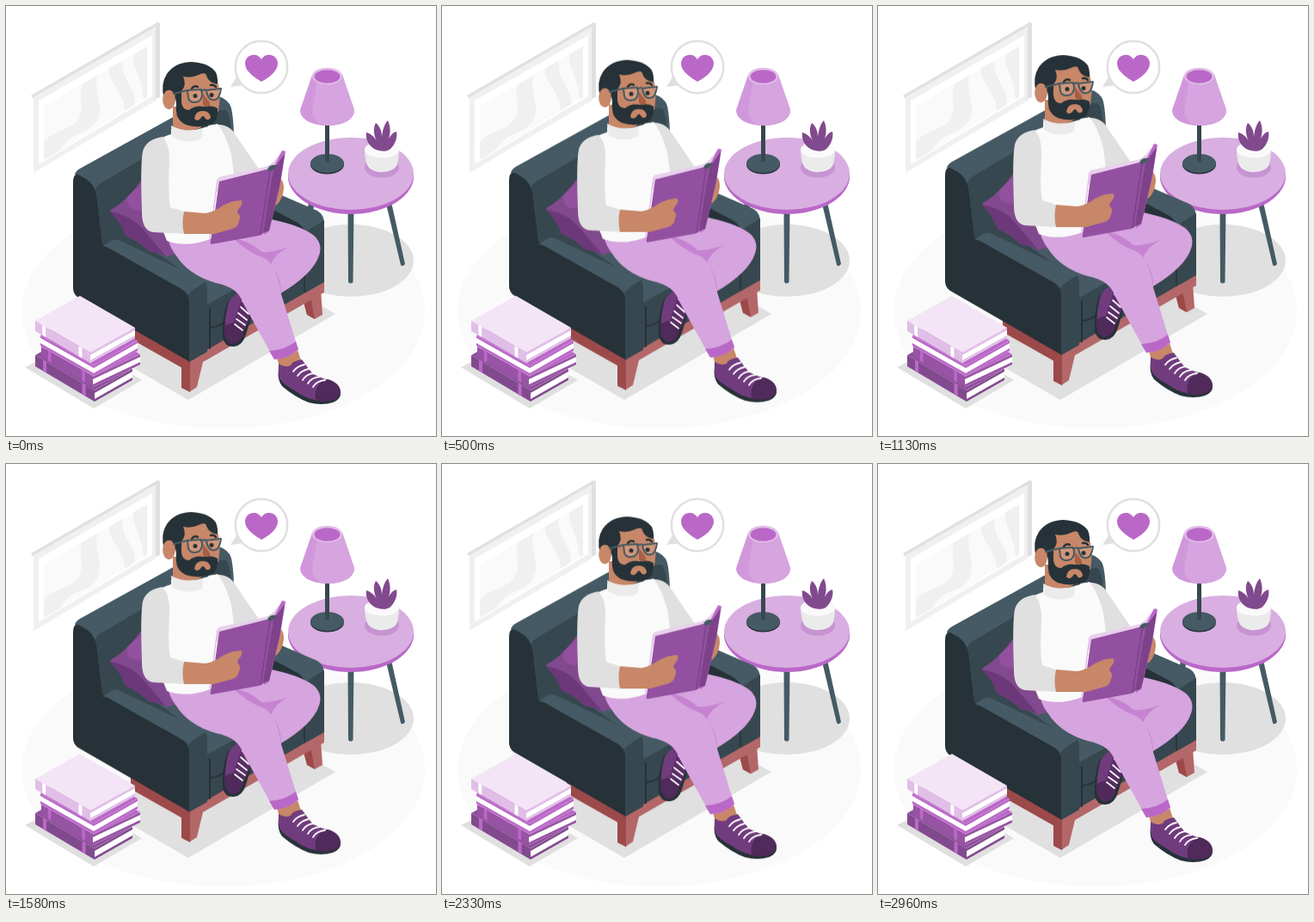
An HTML page for the animation above (3 s loop, 500 by 500 pixels).

```html
<!DOCTYPE html>
<html lang="en">
<head>
<meta charset="utf-8">
<title>Reading in an armchair</title>
<style>
html, body { margin: 0; width: 100%; height: 100%; overflow: hidden; background: #fff; }
svg { display: block; width: 100%; height: 100%; }
.float { animation: float 1.5s cubic-bezier(.37, 0, .63, 1) infinite alternate; }
@keyframes float { to { transform: translateY(-9.2px); } }
.line { fill: none; stroke-linecap: round; stroke-linejoin: round; }
.dark { fill: #263238; }
.mid { fill: #37474f; }
.light { fill: #455a64; }
.skin { fill: #c78768; }
.lilac { fill: #d6a4de; }
.violet { fill: #ba68c8; }
.plum { fill: #713c7e; }
.deep { fill: #4f2a5a; }
.grey { fill: #e0e0e0; }
</style>
</head>
<body>
<svg viewBox="0 0 500 500">
  <defs>
    <clipPath id="art"><path d="M44 117L164 47V106L44 179Z"/></clipPath>
  </defs>

  <!-- floor -->
  <ellipse cx="252.500" cy="355" rx="234.500" ry="136.500" fill="#fafafa"/>
  <ellipse class="grey" cx="401" cy="296" rx="73" ry="42"/>
  <path class="grey" d="M100 393L212 458L383 358L290 305Z"/>
  <path class="grey" d="M22 420L102 468L158 435L80 390Z"/>

  <!-- picture -->
  <path class="grey" d="M29 104L176 19L179 20V106L174 108L33 109Z"/>
  <path fill="#f0f0f0" d="M32 106L174 24V110L32 194Z"/>
  <path fill="#fff" d="M38 110L170 34V105L38 184Z"/>
  <path fill="#fafafa" d="M44 117L164 47V106L44 179Z"/>
  <g clip-path="url(#art)" fill="#f0f0f0">
    <path d="M44 158C58 142 78 146 86 128C92 114 82 106 90 87L108 77C98 100 118 116 104 136C90 152 76 144 62 169L44 181Z"/>
    <path d="M120 70C116 88 138 98 138 122L150 115C152 94 132 86 136 61Z"/>
    <path d="M148 54C146 72 158 80 160 109L168 104V45Z"/>
  </g>

  <!-- thought bubble -->
  <path class="grey" d="M261 94L269 81L278 92Z"/>
  <circle cx="297" cy="71" r="30.200" fill="#fff" stroke="#e0e0e0" stroke-width="2.500"/>
  <path class="violet" d="M297 88C289 83 278 76 278 67C278 56 292 53 297 62C302 53 316 56 316 67C316 76 305 84 297 88Z"/>

  <!-- table -->
  <path class="light" d="M352 228H359L350 272H345ZM442 230L448 228L464 300Q461 304 459 301ZM397.500 236H404.500L403.500 321Q401 324 398 321Z"/>
  <path class="violet" d="M328 195V201C331 224 363 242 401 242S471 224 474 201V195Z"/>
  <ellipse cx="401" cy="195" rx="73" ry="42" fill="#d9aee1"/>
  <ellipse class="dark" cx="373.500" cy="184.300" rx="19.500" ry="11.300"/>
  <ellipse class="light" cx="373.500" cy="183" rx="19.500" ry="11"/>
  <path class="mid" d="M371 133H376V180Q373.500 183 371 180Z"/>
  <path fill="#d197db" d="M356 80L342 121C342 132 356 139 374 139S405 132 405 121L391 80Z"/>
  <path fill="#d6a4de" d="M362 87L356 121Q356 133 368 139C390 140 405 133 405 121L391 80Z"/>
  <ellipse cx="373.500" cy="81.500" rx="17.500" ry="9.800" fill="#e1bee7"/>
  <ellipse class="violet" cx="373.500" cy="82" rx="15" ry="7.800"/>

  <!-- plant -->
  <ellipse cx="437" cy="188" rx="20" ry="11.500" fill="#c794d2"/>
  <path fill="#ebebeb" d="M417 166Q417 182 422 188Q429 194 438 193Q449 193 454 186Q457 180 457 166Z"/>
  <ellipse cx="437" cy="167" rx="20" ry="9.500" fill="#fafafa"/>
  <path fill="#824a8e" d="M428 166C420 161 418 153 419 147C425 149 429 153 431 157C427 148 427 141 430 136C435 140 437 146 437 152C438 144 440 137 444 133C448 142 447 150 444 157C446 151 450 147 454 146C456 154 451 163 446 167C441 170 434 169 428 166Z"/>

  <g class="float">
    <!-- wooden base -->
    <path fill="#9c494a" d="M145 371L214 408V426L145 387Z"/>
    <path fill="#b36768" d="M345 340L366 330L368 359L359 364L350 359Z"/>
    <path fill="#9c494a" d="M345 340L354 338L359 364L350 359Z"/>
    <path fill="#b36768" d="M213 406L370 315V333L229 414L222 443L213 449Z"/>
    <path fill="#9c494a" d="M204 404L214 406V449L204 444Z"/>

    <!-- armchair -->
    <path class="mid" d="M95 260L230 240L350 250L369 260V321L213 412L120 358Z"/>
    <path class="light" d="M80 196Q81 192 86 189L238 105Q252 103 260 114Q264 120 265 150L285 205L240 285L112 280L98 206Z"/>
    <path class="mid" d="M104 213Q105 209 112 205L242 128Q247 118 257 122Q261 130 262 150L285 215L220 300L112 278Z"/>
    <path class="dark" d="M306 220L350 250V290L300 300L270 280Z"/>
    <path class="light" d="M140 262L236 262L346 285L234 347L222 320Z"/>
    <path class="line" stroke="#263238" stroke-width="2" d="M237 398V352M237 374Q244 374 252 369L348 313"/>
    <path class="light" d="M318 219L362 238Q371 243 370 256L350 268Q347 257 339 252L311 237Z"/>
    <path class="mid" d="M347 270Q348 263 354 259L370 249V321L347 334Z"/>
    <path class="line" stroke="#263238" stroke-width="1.500" d="M347 332V280"/>
    <path class="dark" d="M78 205Q78 193 86 197L93 201Q103 208 105 219L112 277L130 287L204 329Q213 335 214 346V414L84 339Q78 335 78 328Z"/>
    <path class="light" d="M112 280L122 273Q127 270 133 273L225 317Q232 320 233 328L214 340Q211 333 204 329L124 284Q116 279 112 280Z"/>
    <path class="mid" d="M211 337Q217 329 232 321Q234 325 234 330V402L213 414V345Q213 339 211 337Z"/>

    <!-- cushion -->
    <path fill="#824a8e" d="M121 239Q122 236 127 234Q144 222 157 203L172 207L204 289Q190 289 187 292Q176 286 166 285Q154 273 139 267Q134 252 121 239Z"/>
    <path fill="#6c3879" d="M121 239L127 240Q148 246 158 258L186 291Q176 286 166 285Q154 273 139 267Q134 252 121 239Z"/>
    <path fill="#92509e" d="M141 222L157 207V238Q139 238 141 222Z"/>

    <!-- far arm and hand -->
    <path class="grey" d="M235 139Q258 134 267 150L293 188L289 200L257 204Z"/>
    <path class="skin" d="M309 196L319 201Q323 203 323 212Q322 224 315 231L305 235Z"/>

    <!-- far shoe -->
    <path class="dark" d="M258 343Q250 365 252 386Q255 397 265 396Q275 395 279 382L287 355L280 335Z"/>
    <path class="plum" d="M259 344Q268 331 275 334L285 348Q284 365 276 378Q263 393 255 382Q253 365 259 344Z"/>
    <path fill="#5a2e66" d="M276 335L285 348Q284 365 277 376L264 370Z"/>
    <path class="deep" d="M254 372Q268 364 277 375Q274 394 262 393Q253 389 254 372Z"/>
    <path class="line" stroke="#fff" stroke-width="1.700" d="M275 343L284 350M273 350L282 358M270 357L280 365M268 364L278 371M266 370L275 377"/>

    <!-- legs -->
    <path class="lilac" d="M258 262L302 247Q338 253 357 266Q369 276 364 290Q357 312 318 335L280 320Z"/>
    <path fill="#c683d2" d="M258 268Q284 273 297 286Q310 287 329 280Q312 288 308 301Q319 312 320 332L296 320Z"/>
    <path class="skin" d="M314 405L338 397L344 415Q336 424 318 420Z"/>
    <path class="lilac" d="M189 273L240 266L262 268Q281 287 300 293Q316 302 320 335L340 400Q328 410 312 411L276 346Q270 327 244 322Q212 313 197 289Q191 281 189 273Z"/>
    <path class="violet" d="M306 401Q325 400 337 390L340 399Q330 410 312 411Z"/>

    <!-- near shoe -->
    <path class="dark" d="M317 423Q315 434 321 442Q336 455 352 461Q367 465 380 461Q390 457 389 449L350 435Z"/>
    <path class="plum" d="M317 416Q324 421 331 418Q332 413 344 411Q351 421 357 428Q367 433 379 436Q389 441 389 449Q387 458 371 459Q353 460 337 448Q322 440 318 433Q316 425 317 416Z"/>
    <path class="deep" d="M360 459Q357 439 374 434Q388 438 389 449Q388 459 371 460Z"/>
    <path class="line" stroke="#fff" stroke-width="1.800" d="M334 425Q338 419 347 417M339 430Q343 424 352 422M345 435Q349 428 358 427M351 439Q355 432 365 431M357 443Q361 436 371 435"/>

    <!-- neck and jumper -->
    <path fill="#fafafa" d="M192 143Q211 151 228 142L246 137Q256 150 262 173L265 196L248 204L240 270Q211 282 187 273L180 255L173 160Q178 153 192 149Z"/>
    <path class="grey" d="M182 152Q163 155 159 169Q156 185 158 240Q158 261 171 263L208 265L207 239L191 234Q188 219 190 181Q191 162 182 152Z"/>
    <path fill="#ebebeb" d="M192 139Q211 147 229 142L228 154Q210 162 193 152Z"/>
    <path class="skin" d="M194 117H226V142Q211 148 194 140Z"/>
    <path fill="#a96a50" d="M197 126L227 134V141Q204 140 197 126Z"/>

    <!-- head -->
    <path class="dark" d="M184 108Q179 91 187 79Q197 65 216 65Q236 66 244 77Q247 84 246 96L220 110Z"/>
    <path class="skin" d="M196 102L205 98Q210 91 206 82Q216 84 224 80Q232 76 233 81Q236 90 247 91Q250 104 247 122Q239 135 220 134Q201 130 196 102Z"/>
    <ellipse class="skin" cx="189.500" cy="109" rx="7.300" ry="11.300"/>
    <path class="dark" d="M196 98L204 96V112Q205 121 213 121Q220 115 230 117Q240 115 246 119Q247 132 240 137Q225 143 209 138Q196 132 198 114Z"/>
    <path class="skin" d="M219 131Q220 122 229 122Q237 122 238 130Q235 134 232 131Q229 125 226 131Q222 135 219 131Z"/>
    <path fill="#a65f45" d="M229 102L236 111Q239 115 235 117Q231 118 229 114Z"/>
    <path fill="#dba98e" opacity=".45" d="M212 98H227V110Q219 115 212 109ZM234 97H248V108Q241 112 235 107Z"/>
    <circle class="dark" cx="220" cy="104.500" r="2.500"/>
    <circle class="dark" cx="239" cy="103.500" r="2.500"/>
    <path class="line" stroke="#263238" stroke-width="2.500" d="M216 96Q219 92 223 94M238 92Q242 91 244 94"/>
    <path class="line" stroke="#455a64" stroke-width="2" d="M195 102L211 98L227 97Q230 107 224 111Q214 114 212 107L211 98M227 99Q231 96 233 98L250 96Q248 109 243 109Q235 111 233 98"/>

    <!-- book -->
    <path fill="#e8d1ec" d="M245 205L247 199L301 187Q307 185 311 181L320 170L317 196L245 216Z"/>
    <path class="violet" d="M321 168L325 169L319 207L306 262L300 266L310 190Z"/>
    <path fill="#7d4289" d="M311 190L324 172L318 210L306 261L297 265Z"/>
    <path fill="#9350a0" d="M248 204L311 188L299 264Q298 266 294 267L239 277Q237 277 238 273Z"/>
    <path class="line" stroke="#e1bee7" stroke-width="1.500" d="M246 202L237 270"/>
    <path class="line" stroke="#7d4289" stroke-width="1.500" d="M307 191L296 265"/>
    <path fill="#455a64" d="M304 190Q306 184 315 185L311 190Q308 193 304 190Z"/>

    <!-- near hand -->
    <path class="skin" d="M207 239L232 241Q243 239 252 232Q263 226 273 226Q276 227 273 233Q269 237 269 240Q274 244 271 250Q270 258 260 260L242 265H207Q204 252 207 239Z"/>
  </g>

  <g id="books"></g>
</svg>
<script>
const poly = (fill, ...pts) => `<path fill="${fill}" d="M${pts.map(p => p.join(' ')).join('L')}Z"/>`;
const down = ([x, y], d) => [x, y + d];
const mix = (a, b, t) => [a[0] + (b[0] - a[0]) * t, a[1] + (b[1] - a[1]) * t];
const slab = (a, b, y, d, fill) => poly(fill, down(a, y), down(b, y), down(b, y + d), down(a, y + d));

// Page edges between two covers.
const pages = (a, b, h, cover) =>
  slab(a, b, 0, h, '#fff') + slab(a, b, 0, 3, cover) + slab(a, b, h - 3, 3, cover);

// A lying book; without a band its page edges face both ways.
function book({ left, front, right, h, top, cover, band }) {
  const back = [left[0] + right[0] - front[0], left[1] + right[1] - front[1]];
  const stripe = t => slab(mix(left, front, t), mix(left, front, t + .06), 0, h, band);
  const spine = slab(left, front, 0, h, cover);
  return poly(top, left, back, right, front)
    + pages(front, right, h, cover)
    + (band ? spine + stripe(.13) + stripe(.79) : pages(left, front, h, cover));
}

const stack = [
  { left: [34, 406], front: [103, 447], right: [147, 422], h: 13, top: '#92509e', cover: '#824a8e', band: '#ba68c8' },
  { left: [41, 396], front: [101, 431], right: [156, 405], h: 12, top: '#ba68c8', cover: '#9854a4', band: '#ba68c8' },
  { left: [40, 383], front: [102, 418], right: [153, 389], h: 12, top: '#ba68c8', cover: '#ba68c8' },
  { left: [34, 366], front: [98, 403], right: [150, 374], h: 12, top: '#f3e5f5', cover: '#e1bee7', band: '#fff' }
];
document.getElementById('books').innerHTML = stack.map(book).join('');
</script>
</body>
</html>
```
